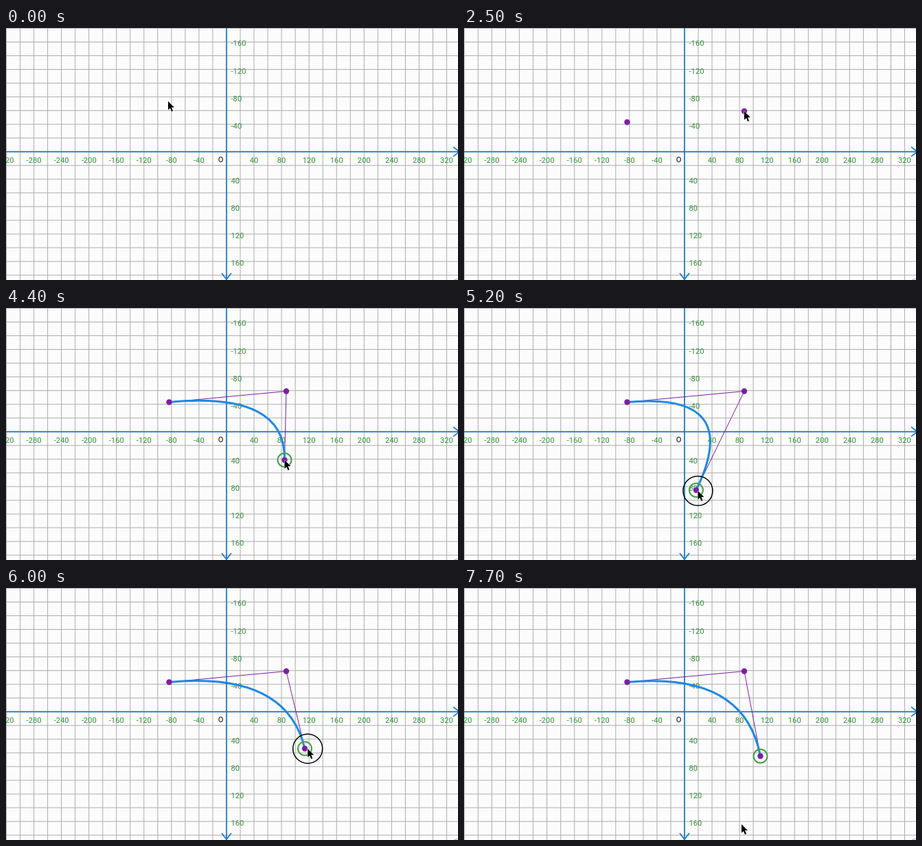
Animation, 658 px wide and 368 px high, one loop 7800 ms. Source, as an HTML page with a canvas:

```html
<!DOCTYPE html>
<html lang="en">
<head>
<meta charset="utf-8">
<title>Quadratic curve editor</title>
<style>
html, body { margin: 0; width: 100%; height: 100%; overflow: hidden; background: #fcfcfc; }
canvas { display: block; }
</style>
</head>
<body>
<canvas id="stage" width="658" height="368"></canvas>
<script>
const W = 658, H = 368, LOOP = 7800, STEP = 100;
const OX = 321, OY = 180.7, UNIT = 20.03;
const GRID = '#acacac', AXIS = '#1976d2', BLUE = '#1e88e5';
const PURPLE = '#7b1fa2', GREEN = '#388e3c', RING = '#43a047';
const START = [237.5, 137.5], CONTROL = [408, 121.5], END = [405.5, 222], DROP = [431.5, 245.5];
const HOME = [236, 107], HOVER = [240, 141], EXIT = [404, 345];
const GLIDE = 700, CLICK = 200, DRAG = 4700, SETTLE = 6300, RELEASE = 6700, LAG = 100;
const ctx = document.getElementById('stage').getContext('2d');

// Each glide starts at its time and eases towards its target.
const glides = [[200, HOVER], [1100, START], [1700, CONTROL], [2700, END]];
const placed = [1700, 2400, 3500];

const clamp = u => Math.min(1, Math.max(0, u));
const ease = u => u * u * (3 - 2 * u);
const mix = (a, b, u) => a.map((v, i) => v + (b[i] - v) * u);
const glide = (from, to, begin, t) => mix(from, to, ease(clamp((t - begin) / GLIDE)));

// A dying swing to the lower left while the end point is held.
function dragAt(t) {
  const u = clamp((t - DRAG) / (SETTLE - DRAG));
  const swing = (1 - u) * Math.sin(4.7 * u);
  const [x, y] = mix(END, DROP, u);
  return [x - 107 * swing, y + 55 * swing];
}

function pointerAt(t) {
  if (t >= DRAG) return glide(dragAt(t), EXIT, RELEASE, t);
  return glides.reduce((pos, [begin, to]) => glide(pos, to, begin, t), HOME);
}

function trace(points) {
  ctx.beginPath();
  points.forEach(p => ctx.lineTo(...p));
}

function stroke(color, width) {
  ctx.strokeStyle = color;
  ctx.lineWidth = width;
  ctx.stroke();
}

function fill(color) {
  ctx.fillStyle = color;
  ctx.fill();
}

function line(points, color, width) {
  trace(points);
  stroke(color, width);
}

function circle([x, y], r) {
  ctx.beginPath();
  ctx.arc(x, y, r, 0, 2 * Math.PI);
}

function label(text, x, y, align, color = GREEN) {
  ctx.fillStyle = color;
  ctx.textAlign = align;
  ctx.fillText(text, x, y);
}

function cross(x, y, color, width) {
  line([[x, 0], [x, H]], color, width);
  line([[0, y], [W, y]], color, width);
}

function drawPlane() {
  ctx.fillStyle = '#fcfcfc';
  ctx.fillRect(0, 0, W, H);
  for (let k = -16; k <= 16; k++) cross(OX + k * UNIT, OY + k * UNIT, GRID, 1);
  cross(OX, OY, AXIS, 1.7);
  line([[W - 7, OY - 7], [W + 2, OY], [W - 7, OY + 7]], AXIS, 1.7);
  line([[OX - 7, H - 10], [OX, H - 1], [OX + 7, H - 10]], AXIS, 1.7);
  line([[W - 6, H], [W, H - 2]], GRID, 1);

  ctx.font = '11.2px Roboto, sans-serif';
  for (let k = -16; k <= 16; k += 2) {
    if (!k) continue;
    label(k * 20, OX + k * UNIT, OY + 16.3, 'center');
    label(k * 20, OX + 6.5, OY + k * UNIT + 6, 'left');
  }
  label('O', OX - 8.5, OY + 15, 'center', '#000');
}

function drawCurve(end) {
  line([START, CONTROL, end], PURPLE, 1);
  ctx.beginPath();
  ctx.moveTo(...START);
  ctx.quadraticCurveTo(...CONTROL, ...end);
  stroke(BLUE, 3);
}

function drawPointer([x, y]) {
  ctx.save();
  ctx.translate(x, y);
  trace([[0, 0], [0, 12.5], [3, 10], [5, 15], [7, 14], [5, 9], [9, 9]]);
  ctx.closePath();
  stroke('#fff', 1);
  fill('#000');
  ctx.restore();
}

function draw(t) {
  const pointer = pointerAt(t);
  const end = dragAt(t - LAG);
  drawPlane();
  if (t >= placed[2]) drawCurve(end);
  [START, CONTROL, end].forEach((p, i) => {
    if (t < placed[i]) return;
    circle(p, 4.2);
    fill(PURPLE);
  });
  if (t >= placed[2] + CLICK) {
    circle(end, 10);
    stroke(RING, 2);
  }
  const clicking = placed.some(p => t >= p - CLICK && t < p);
  if (clicking || t >= DRAG && t < RELEASE) {
    circle(pointer, 21.5);
    stroke('#000', 1.5);
  }
  drawPointer(pointer);
}

const begin = performance.now();
function tick() {
  const t = (performance.now() - begin) % LOOP;
  draw(Math.floor(t / STEP) * STEP);
  requestAnimationFrame(tick);
}
tick();
</script>
</body>
</html>
```
